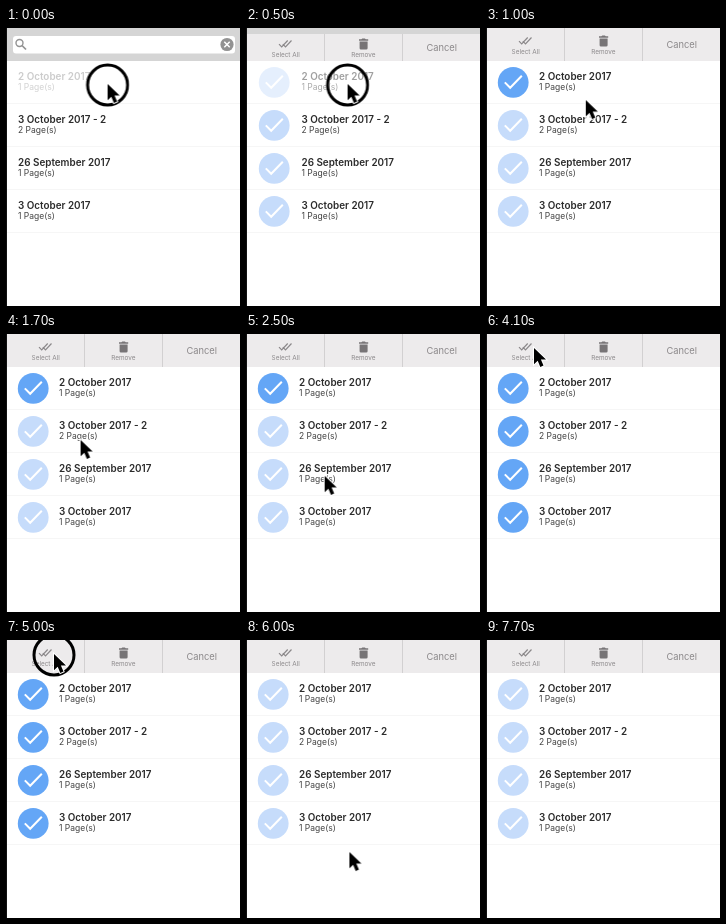
An HTML page for the animation above (8000 ms loop, 234 by 278 pixels).

```html
<!DOCTYPE html>
<html lang="en">
<head>
<meta charset="utf-8">
<title>Multi-select list</title>
<style>
  html, body { margin: 0; width: 100%; height: 100%; overflow: hidden; background: #fff; }
  svg { display: block; font-family: Inter, "Liberation Sans", sans-serif; }
  #stage { width: 100vw; height: 100vh; }
  .title { font-size: 9.9px; font-weight: 600; fill: #2b2b2b; }
  .sub { font-size: 8.5px; fill: #444; }
  .label { font-size: 6.4px; fill: #8b888a; text-anchor: middle; }
  .cancel { font-size: 9.3px; fill: #8b888a; text-anchor: middle; }

  .bar, .tools, .words, .badge, .first, .disc, #cursor, #ring {
    animation: 8s linear infinite;
  }
  .bar { animation-name: bar; }
  .tools { animation-name: tools; }
  .words { animation-name: words; }
  .badge { animation-name: badge; }
  .first { animation-name: wake; }
  .disc { fill: #c6dcfb; animation-name: pickAll; }
  .first .disc { animation-name: pickFirst; }
  #cursor { animation-name: travel; animation-timing-function: ease-in-out; }
  #ring { animation-name: press; animation-timing-function: step-end; }

  @keyframes bar {
    0%, 2% { transform: translateY(-34px); }
    4.8% { transform: translateY(5px); }
    6.25% { transform: translateY(6px); }
    8.75%, 100% { transform: none; }
  }
  @keyframes tools {
    0%, 2% { transform: translateY(-34px); }
    4.8%, 6.25% { transform: translateY(3px); }
    8.75%, 100% { transform: none; }
  }
  @keyframes words {
    0%, 1.5% { transform: translateX(-41px); }
    5% { transform: translateX(2px); }
    6.25% { transform: translateX(2.5px); }
    8.75%, 100% { transform: none; }
  }
  @keyframes badge {
    0%, 1.5% { transform: translateX(-48px); }
    5%, 6.25% { transform: translateX(1px); }
    8.75%, 100% { transform: none; }
  }
  @keyframes wake {
    0%, 1.25% { opacity: .24; }
    6.25% { opacity: .45; }
    8.75%, 11% { opacity: .6; }
    12.5%, 100% { opacity: 1; }
  }
  @keyframes pickFirst {
    0%, 11% { fill: #c6dcfb; }
    12.5%, 63.5% { fill: #64a6f6; }
    66%, 100% { fill: #c6dcfb; }
  }
  @keyframes pickAll {
    0%, 49% { fill: #c6dcfb; }
    51.25%, 63.5% { fill: #64a6f6; }
    66%, 100% { fill: #c6dcfb; }
  }
  @keyframes travel {
    0%, 11.25% { transform: translate(101.6px, 56px); }
    16.25% { transform: translate(88px, 178px); }
    21.25%, 23.5% { transform: translate(74.6px, 106px); }
    28.75% { transform: translate(78px, 159px); }
    35% { transform: translate(80px, 108px); }
    39%, 42.5% { transform: translate(82.6px, 65px); }
    47.5%, 51.5% { transform: translate(48px, 14px); }
    56.25% { transform: translate(98px, 74px); }
    60.5%, 63.75% { transform: translate(48px, 14px); }
    72.5%, 75% { transform: translate(103.4px, 212px); }
    81.25%, 84% { transform: translate(133px, 237px); opacity: 1; }
    90% { transform: translate(164px, 238px); opacity: 1; }
    91.25%, 99.99% { transform: translate(164px, 238px); opacity: 0; }
    100% { transform: translate(101.6px, 56px); opacity: 1; }
  }
  @keyframes press {
    0% { opacity: 1; }
    11.25% { opacity: 0; }
    48% { opacity: 1; }
    51.25% { opacity: 0; }
    61% { opacity: 1; }
    63.75%, 100% { opacity: 0; }
  }
</style>
</head>
<body>
<svg id="stage" viewBox="0 0 234 278">
  <rect width="234" height="278" fill="#fff"/>
  <g id="rows"></g>

  <svg width="234" height="33">
    <rect width="234" height="33" fill="#d5d5d5"/>
    <rect x="7" y="8" width="222" height="17.5" rx="3" fill="#fff"/>
    <g fill="none" stroke="#929292" stroke-width="1.4">
      <circle cx="13.5" cy="15" r="3.5"/>
      <path d="M16 17.5l4 4" stroke-width="1.7"/>
    </g>
    <circle cx="221" cy="16.5" r="6.6" fill="#929292"/>
    <path d="M218.3 13.8l5.4 5.4m0-5.4l-5.4 5.4" stroke="#fff" stroke-width="1.5"/>

    <g class="bar">
      <rect width="234" height="34" fill="#edebec"/>
      <path d="M78.5 0V33M156.5 0V33" stroke="#d2d0d1"/>
    </g>
    <g class="tools">
      <path d="M33 13.2l2.7 2.7 6-6.4M36.8 13.2l2.7 2.7 6-6.4" fill="none" stroke="#8b888a" stroke-width="1.2"/>
      <text class="label" x="39.7" y="25.6">Select All</text>
      <path d="M113 8.3h2.4l.9-.9h2.6l.9.9h2.4v1.5h-9.2zM113.6 10.6h8v6.6q0 1.4-1.4 1.4h-5.2q-1.4 0-1.4-1.4z" fill="#777476"/>
      <text class="label" x="117.3" y="25.6">Remove</text>
      <text class="cancel" x="195.7" y="20.2">Cancel</text>
    </g>
  </svg>

  <rect width="1" height="278" fill="#111"/>

  <g id="cursor">
    <circle id="ring" cy="1" r="20" fill="none" stroke="#000" stroke-width="3"/>
    <path d="M0 0V16.2L3.7 12.8 6.3 19 9.5 17.6 6.9 11.6H12Z" fill="#000" stroke="#fff" stroke-width="2" paint-order="stroke"/>
  </g>
</svg>
<script>
  const entries = [
    ["2 October 2017", 1],
    ["3 October 2017 - 2", 2],
    ["26 September 2017", 1],
    ["3 October 2017", 1]
  ];
  const rowHeight = 43;

  const row = ([title, pages], i) => `
    <g transform="translate(0 ${33 + i * rowHeight})">
      <path d="M1 42.5H234" stroke="#f6f6f6"/>
      <g class="${i ? "" : "first"}">
        <g class="badge">
          <circle class="disc" cx="27.2" cy="21.4" r="15.4"/>
          <path d="M18.8 21.4l5.4 5.4 11.6-12" fill="none" stroke="#fff" stroke-width="2"/>
        </g>
        <g class="words">
          <text class="title" x="53" y="18.7">${title}</text>
          <text class="sub" x="53" y="29.2">${pages} Page(s)</text>
        </g>
      </g>
    </g>`;

  document.getElementById("rows").innerHTML = entries.map(row).join("");
</script>
</body>
</html>
```
